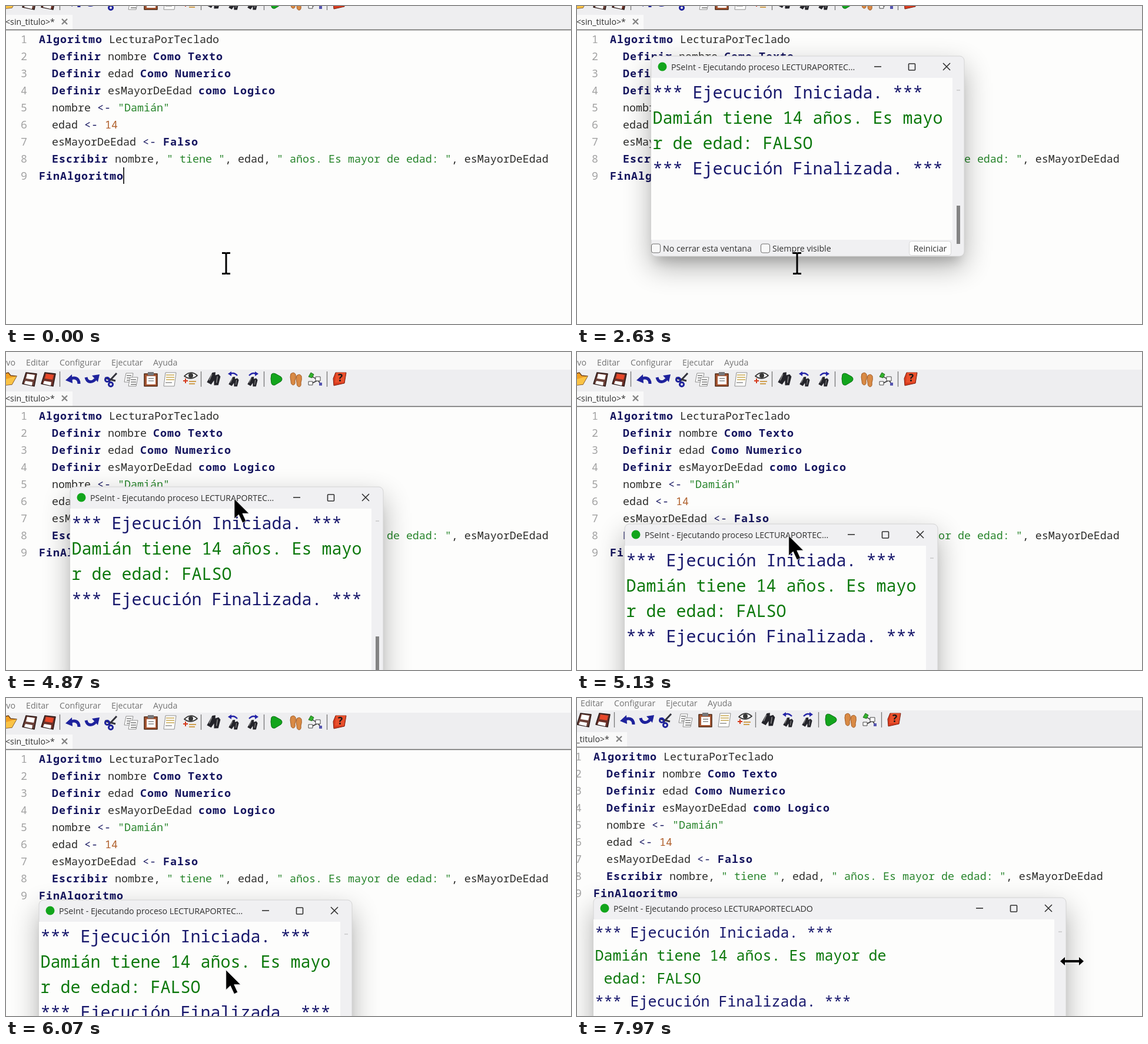
An HTML page for the animation above (8000 ms loop, 960 by 540 pixels).

```html
<!DOCTYPE html>
<html lang="es">
<head>
<meta charset="utf-8">
<title>Lectura por teclado</title>
<style>
html, body { margin: 0; height: 100%; overflow: hidden; background: #fdfdfc; }
svg { display: block; width: 100vw; height: 100vh; }
text { white-space: pre; font: 14.2px "Open Sans", "Noto Sans", sans-serif; fill: #303030; }
.menu text { fill: #737373; }
.code text { font: 18.33px "Noto Sans Mono", monospace; fill: #2c2c2a; }
.code .k { font-weight: 700; letter-spacing: 1px; fill: #14145e; }
.code .op { letter-spacing: 1px; fill: #14145e; font-weight: 500; }
.code .s { fill: #26842a; }
.code .n { fill: #b0602c; }
.code .no { fill: #a2a2a2; }
.con text { font-family: "Noto Sans Mono", monospace; fill: #18186c; }
.con .out { fill: #0c780c; }
</style>
</head>
<body>
<svg viewBox="0 0 960 540">
  <rect width="960" height="540" fill="#fdfdfc"/>
  <g id="world">
    <rect x="-40" width="1060" height="92" fill="#eeeef0"/>
    <rect x="-40" width="1060" height="30" fill="#f9f9f9"/>
    <g class="menu" id="menu"></g>
    <g id="icons"></g>
    <path d="M-40 67H113V92H-40Z" fill="#f9f9f9"/>
    <text x="-1" y="84">&lt;sin_titulo&gt;*</text>
    <path d="M95 74l9 9m0-9l-9 9" stroke="#858585" stroke-width="2.4"/>
    <path d="M-40 92.5H1020" stroke="#666" stroke-width="1.6"/>
    <g class="code" id="code"></g>
    <path id="caret" d="M200 326V354" stroke="#000" stroke-width="1.6"/>
    <g id="win">
      <rect id="glow" y="18" height="340" opacity=".3" style="filter:blur(24px)"/>
      <rect id="shade" x="8" y="40" height="308" opacity=".14" style="filter:blur(9px)"/>
      <rect id="frame" height="340" rx="8" fill="#f0f0f2" stroke="#d4d4d4"/>
      <circle cx="19" cy="18" r="7.5" fill="#12a51c"/>
      <text id="title" x="34" y="24"></text>
      <rect id="page" y="37" height="275" fill="#fdfdfc"/>
      <g class="con" id="big"></g>
      <g class="con" id="small"></g>
      <g fill="#f8f8f8" stroke="#6c6c6c">
        <rect x=".5" y="319" width="15" height="15" rx="3"/>
        <rect x="186.5" y="319" width="15" height="15" rx="3"/>
      </g>
      <text x="20" y="332">No cerrar esta ventana</text>
      <text x="206" y="332">Siempre visible</text>
      <g id="right">
        <g fill="none" stroke="#303030" stroke-width="1.6">
          <path d="M379 18H391"/>
          <rect x="437.5" y="13" width="11" height="11" rx="1"/>
          <path d="M496 12l12 12m0-12l-12 12"/>
        </g>
        <path d="M519 58H525" stroke="#b4b4b4"/>
        <rect x="519" y="254" width="6" height="65" fill="#848484"/>
        <rect x="438.5" y="314.5" width="71" height="24" rx="4" fill="#fdfdfd" stroke="#d6d6d6"/>
        <text x="474" y="332" text-anchor="middle">Reiniciar</text>
      </g>
    </g>
  </g>
  <g id="mouse">
    <path id="beam" d="M-7-17.5H-2Q0-17.5 0-15Q0-17.5 2-17.5H7M0-16V16M-7 17.5H-2Q0 17.5 0 15Q0 17.5 2 17.5H7" fill="none" stroke="#000" stroke-width="3"/>
    <path id="arrow" d="M0-1V33L7.5 26L14 40L20 37L14 24H25Z" fill="#000" stroke="#fff" stroke-width=".8"/>
    <path id="size" d="M-20 0L-12-7V-2H12V-7L20 0L12 7V2H-12V7Z" fill="#000"/>
  </g>
</svg>
<script>
const $ = id => document.getElementById(id);
const esc = s => s.replace(/</g, '&lt;').replace(/>/g, '&gt;');
const label = (x, y, s, attrs = '') => `<text x="${x}" y="${y}" ${attrs}>${s}</text>`;
const path = (d, fill = 'none', line = 'none', w = 1) =>
  `<path d="${d}" fill="${fill}" stroke="${line}" stroke-width="${w}" stroke-linejoin="round"/>`;

$('menu').innerHTML = label(16, 23, 'Archivo', 'text-anchor="end"') + label(34, 23, 'Editar') +
  label(91, 23, 'Configurar') + label(179, 23, 'Ejecutar') + label(250, 23, 'Ayuda');

// Toolbar
const disk = (x, body, tag) => path(`M${x - 6} 35L${x + 12} 37L${x + 8} 58L${x - 12} 54Z`, body, '#2c1a18', 1.5) +
  path(`M${x - 4} 37L${x + 9} 39L${x + 7} 47L${x - 6} 45Z`, tag) +
  path(`M${x - 7} 49L${x + 5} 51L${x + 4} 57L${x - 9} 54Z`, '#fff');
const sheet = (x, y, w, h, line) => path(`M${x + 3} ${y}h${w}l-3 ${h}h${-w}Z`, '#fff', '#8d8d8d') +
  path([4, 8, 12].filter(d => d < h).map(d => `M${x + 4} ${y + d}h${w - 4}`).join(''), 'none', line, 1.4);
const glasses = x => `<g transform="rotate(14 ${x} 46)">` +
  path(`M${x - 5} 36L${x} 34L${x + 1} 39L${x + 6} 36L${x + 10} 39L${x + 10} 54L${x + 3} 56L${x + 1} 48L${x - 2} 56L${x - 10} 54Z`, '#24242a') +
  path(`M${x - 5} 39l-2 11M${x + 5} 40l1 11`, 'none', '#8a8a8a', 1.5) + '</g>';
const seek = (x, dir) => `<g transform="translate(${x} 50) scale(.75) translate(${-x} -45)">${glasses(x)}</g>` +
  path(`M${x - 6 * dir} 40Q${x} 34 ${x + 5 * dir} 37`, 'none', '#2525a8', 2.4) +
  path(`M${x + 10 * dir} 37l${-6 * dir} -4v8Z`, '#2525a8');
const sole = (x, y) => path(`M${x - 4} ${y}q5 -4 8 1q1 6 -1 11q1 7 -3 7q-4 0 -4 -7q-2 -7 0 -12Z`, '#d98a45', '#a05a24');

$('icons').innerHTML =
  path('M-10 39L4 35L8 40L18 41L10 55L-10 57Z', '#f2a022', '#71441a', 1.5) + path('M-4 47L18 41L10 55L-10 57Z', '#fac345') +
  disk(40, '#6b4038', '#fff') + disk(72, '#6b3028', '#e8482a') +
  path('M124 54C124 43 114 42 108 47', 'none', '#1e229c', 5) + path('M101 48L112 38L113 53Z', '#1e229c') +
  path('M136 43C138 53 147 52 152 46', 'none', '#1e229c', 5) + path('M159 38L146 40L156 51Z', '#1e229c') +
  path('M188 36L174 51M168 44L186 49', 'none', '#33333d', 3) +
  '<g fill="none" stroke="#1e229c" stroke-width="3"><circle cx="172" cy="47" r="3.5"/><circle cx="178" cy="55" r="3.5"/></g>' +
  sheet(201, 36, 12, 15, '#777') + sheet(208, 43, 13, 15, '#777') +
  path('M235 37H257V58H235Z', '#a75632', '#4d2814', 1.5) + path('M239 41H254V55H239Z', '#fff') +
  path('M241 34H251V40H241Z', '#77777a') + path('M242 45h9m-9 4h9', 'none', '#888', 1.4) +
  sheet(268, 35, 18, 23, '#c6a650') + path('M271 52h11', 'none', '#888', 1.4) +
  path('M303 41Q314 30 325 40Q314 49 303 41Z', '#fff', '#383838', 1.8) +
  '<circle cx="314" cy="40" r="4" fill="#383838"/>' + path('M301 49h8m-4-4v8', 'none', '#d53a1c', 2) +
  path('M311 50h12m-12 4h10', 'none', '#d0a050', 2) +
  glasses(353) + seek(387, -1) + seek(419, 1) +
  path('M451 38Q453 35 458 37L467 42Q471 46 467 50L457 56Q452 57 451 53Q449 45 451 38Z', '#13a51d', '#087012') +
  sole(488, 37) + sole(498, 40) +
  path('M518 40L530 48L518 54M530 48L535 55', 'none', '#333', 1.5) +
  path('M514 42L518 35L523 38L520 44Z', '#32b32e', '#286c22') + path('M526 42h8v7h-8Z', '#fff', '#444') +
  path('M514 50h7v6h-7Z', '#fff', '#444') + path('M532 52h5v5h-5Z', '#5656b0') +
  path('M560 35H578L575 53L557 57L556 45Z', '#d83a1e', '#7d2210') + path('M561 35H577L574 52H559Z', '#e9502c') +
  '<text x="568" y="50" text-anchor="middle" style="font-weight:700;font-size:17px;fill:#181818">?</text>' +
  path([91, 331, 438, 545].map(x => `M${x + .5} 33V59`).join(''), 'none', '#777', 1.3);

// Editor
const source = `Algoritmo LecturaPorTeclado
  Definir nombre Como Texto
  Definir edad Como Numerico
  Definir esMayorDeEdad como Logico
  nombre <- "Damián"
  edad <- 14
  esMayorDeEdad <- Falso
  Escribir nombre, " tiene ", edad, " años. Es mayor de edad: ", esMayorDeEdad
FinAlgoritmo`;
const token = /\b(FinAlgoritmo|Algoritmo|Definir|[Cc]omo|Texto|Numerico|Logico|Falso|Escribir)\b|(".*?")|(<-)|\d+/g;
const paint = line => line.replace(token, (s, key, str, op) =>
  `<tspan class="${key ? 'k' : str ? 's' : op ? 'op' : 'n'}">${esc(s)}</tspan>`);
$('code').innerHTML = source.split('\n').map((line, i) =>
  label(25, 115 + 29 * i, i + 1, 'class="no"') + label(56, 115 + 29 * i, paint(line))).join('');

// Console output, wrapped to the columns that fit
function output(pitch, lead, base) {
  const cols = Math.floor(505 / pitch), said = 'Damián tiene 14 años. Es mayor de edad: FALSO';
  return ['*** Ejecución Iniciada. ***', said.slice(0, cols), said.slice(cols), '*** Ejecución Finalizada. ***']
    .map((s, i) => label(2.5, base + lead * i, s,
      `style="font-size:${pitch / .6}px" class="${i % 3 ? 'out' : ''}"`)).join('');
}
$('big').innerHTML = output(17, 43, 72);
$('small').innerHTML = output(15, 39, 68);

// Keys: time, x, y
const mouseKeys = [[0, 374, 437], [3300, 374, 437], [3680, 425, 48], [3870, 421, 70], [4200, 405, 158],
  [4350, 405, 158], [4870, 388, 250], [5350, 336, 366], [5500, 336, 366], [5700, 335, 369], [5800, 335, 369],
  [6150, 385, 490], [6600, 450, 470], [7030, 622, 445], [7220, 598, 447], [7330, 598, 447], [7970, 841, 447]];
const viewKeys = [[0, 0, -52], [3520, 0, -52], [3870, 0, -3], [3950, 0, 0], [5900, 0, 0], [6200, 0, -9],
  [7480, 0, -9], [7970, -28, -9]];

const clamp = (v, lo, hi) => Math.min(hi, Math.max(lo, v));
function at(keys, t) {
  const i = keys.findIndex(k => k[0] > t);
  if (i < 0) return keys[keys.length - 1].slice(1);
  const a = keys[i - 1], b = keys[i], f = (t - a[0]) / (b[0] - a[0]);
  return [1, 2].map(n => a[n] + (b[n] - a[n]) * f);
}
const show = (id, on) => $(id).style.display = on ? '' : 'none';
const move = (id, x, y, more = '') => $(id).setAttribute('transform', `translate(${x} ${y})${more}`);

function draw(t) {
  const [vx, vy] = at(viewKeys, t), [mx, my] = at(mouseKeys, t);
  move('world', Math.round(vx), Math.round(vy));
  move('mouse', mx, my);
  show('beam', t < 3315 || t >= 6930 && t < 7200);
  show('arrow', t >= 3315 && t < 6930);
  show('size', t >= 7200);
  show('caret', t < 2000 && t % 1060 < 530);

  // The title bar follows the mouse while dragged; later the right edge does
  const [gx, gy] = at(mouseKeys, clamp(t, 4300, 5750));
  const w = t < 7330 ? 532 : Math.max(532, Math.round(mx - vx - 66));
  const open = 1 - (1 - clamp((t - 2000) / 230, 0, 1)) ** 3, s = .85 + .15 * open;
  show('win', t >= 2000);
  $('win').setAttribute('opacity', open);
  move('win', Math.round(gx - 279) + w / 2 * (1 - s), Math.round(gy - 21) + 170 * (1 - s), ` scale(${s})`);
  $('frame').setAttribute('width', w);
  $('glow').setAttribute('width', w);
  $('shade').setAttribute('width', w - 16);
  $('page').setAttribute('width', w - 20);
  move('right', w - 532, 0);
  $('title').textContent = 'PSeInt - Ejecutando proceso LECTURAPORTEC' + (w < 560 ? '...' : 'LADO');
  show('big', t >= 2170 && t < 6350);
  show('small', t >= 6350);
}

function tick() {
  draw(performance.now() % 8000);
  requestAnimationFrame(tick);
}
tick();
</script>
</body>
</html>
```
